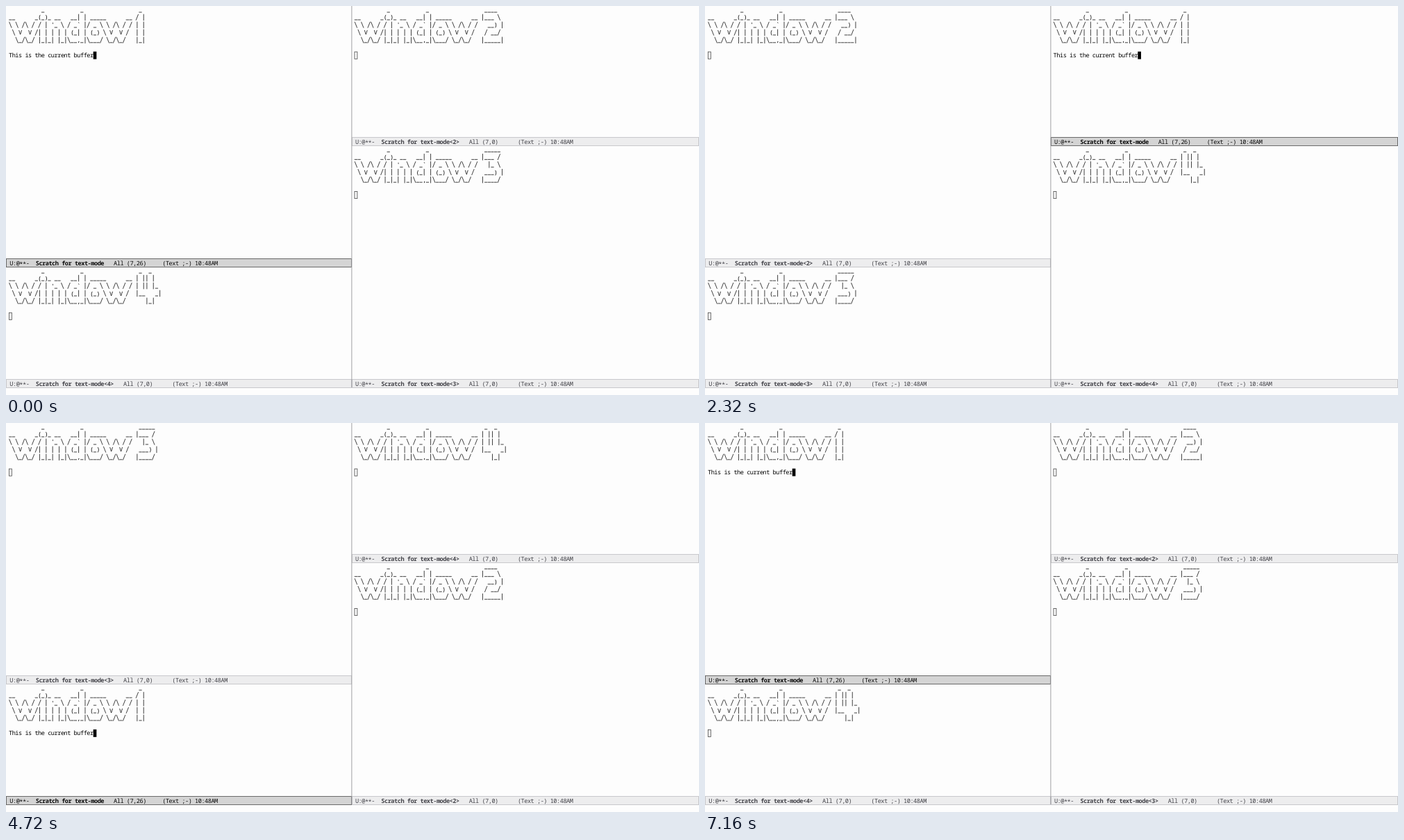
Animation, 998 px wide and 561 px high, one loop 7.64 s. Source, as an HTML page with a canvas:

```html
<!DOCTYPE html>
<html lang="en">
<head>
<meta charset="utf-8">
<title>Rotating windows</title>
<style>
html, body { margin: 0; width: 998px; height: 561px; overflow: hidden; background: #fdfdfd; }
canvas { display: block; }
</style>
</head>
<body>
<canvas id="stage" width="998" height="561"></canvas>
<script>
const ctx = document.getElementById("stage").getContext("2d");
const LOOP = 7640;
const CELL = 4.68;
const LINE = 10.95;
const FAMILY = '8.6px "Noto Sans Mono", "DejaVu Sans Mono", monospace';

// Panes in window order: left column first, then right column.
const panes = [
  { x: 0, y: 0, w: 498, bar: 364 },
  { x: 0, y: 376.2, w: 498, bar: 538 },
  { x: 497.6, y: 0, w: 500, bar: 189 },
  { x: 497.6, y: 201.4, w: 500, bar: 538 }
];
const startOrder = [1, 4, 2, 3];
const rotations = [920, 1760, 2600, 3440, 4240, 5160, 5920, 6680];

const word = [
  "          _           _               ",
  "__      _(_)_ __   __| | _____      __",
  "\\ \\ /\\ / / | '_ \\ / _` |/ _ \\ \\ /\\ / /",
  " \\ V  V /| | | | | (_| | (_) \\ V  V / ",
  "  \\_/\\_/ |_|_| |_|\\__,_|\\___/ \\_/\\_/  "
];
const digits = {
  1: [" _", "/ |", "| |", "| |", "|_|"],
  2: [" ____", "|___ \\", "  __) |", " / __/", "|_____|"],
  3: [" _____", "|___ /", "  |_ \\", " ___) |", "|____/"],
  4: [" _  _", "| || |", "| || |_", "|__   _|", "   |_|"]
};
// Banner strokes inside a cell: x1, y1, x2, y2.
const strokes = {
  "/": [0.6, 9.7, 4.1, 0.9],
  "\\": [0.6, 0.9, 4.1, 9.7],
  "|": [2.34, 0.7, 2.34, 10.2],
  "_": [0.2, 9, 4.48, 9]
};

function write(text, x, baseline, color, weight = "") {
  ctx.font = `${weight} ${FAMILY}`;
  ctx.textRendering = "geometricPrecision";
  ctx.letterSpacing = "0px";
  ctx.letterSpacing = `${CELL - ctx.measureText("0").width}px`;
  ctx.fillStyle = color;
  ctx.fillText(text, x, baseline);
}

function drawBannerRow(row, left, top) {
  ctx.beginPath();
  [...row].forEach((char, col) => {
    const x = left + col * CELL;
    const line = strokes[char];
    if (line) {
      ctx.moveTo(x + line[0], top + line[1]);
      ctx.lineTo(x + line[2], top + line[3]);
    } else if (char !== " ") {
      write(char, x, top + 8.5, "#000");
    }
  });
  ctx.strokeStyle = "#000";
  ctx.lineWidth = 0.75;
  ctx.stroke();
}

function drawBuffer(pane, id) {
  const left = pane.x + 4;
  word.forEach((row, i) =>
    drawBannerRow(`${row} ${digits[id][i]}`, left, pane.y + i * LINE));

  const top = pane.y + 6 * LINE;
  if (id === 1) {
    const text = "This is the current buffer";
    write(text, left, top + 8.5, "#000");
    ctx.fillRect(left + text.length * CELL, top, CELL, LINE);
  } else {
    ctx.strokeStyle = "#444";
    ctx.lineWidth = 0.8;
    ctx.strokeRect(left + 0.4, top + 0.4, CELL - 0.8, LINE - 0.8);
  }
}

function drawModeLine(pane, id) {
  const active = id === 1;
  const color = active ? "#0a0a0a" : "#44444a";
  const name = "Scratch for text-mode" + (active ? "" : `<${id}>`);
  const rest = active ? "All (7,26)     " : "All (7,0)      ";
  const x = Math.round(pane.x);
  ctx.fillStyle = active ? "#d4d4d4" : "#ededee";
  ctx.fillRect(x, pane.bar, pane.w, 13);
  ctx.strokeStyle = active ? "#6a6a6a" : "#c8c8cc";
  ctx.lineWidth = 1;
  ctx.strokeRect(x + 0.5, pane.bar + 0.5, pane.w - 1, 12);

  const at = col => pane.x + 0.6 + col * CELL;
  const baseline = pane.bar + 9.6;
  write("U:@", at(1), baseline, color);
  write("**", at(4), baseline + 1.6, color);
  write("-", at(6), baseline, color);
  write(name, at(9), baseline, color, "bold");
  write(`${rest}(Text ;-) 10:48AM`, at(12 + name.length), baseline, color);
}

function draw(time) {
  ctx.fillStyle = "#fdfdfd";
  ctx.fillRect(0, 0, 998, 561);
  const turns = rotations.filter(t => t <= time).length;
  panes.forEach((pane, i) => {
    const id = startOrder[(i - turns + 8) % 4];
    drawBuffer(pane, id);
    drawModeLine(pane, id);
  });
  ctx.fillStyle = "#a0a0a2";
  ctx.fillRect(497.4, 0, 1, 550);
}

const start = performance.now();
function tick() {
  draw((performance.now() - start) % LOOP);
  requestAnimationFrame(tick);
}
tick();
</script>
</body>
</html>
```
